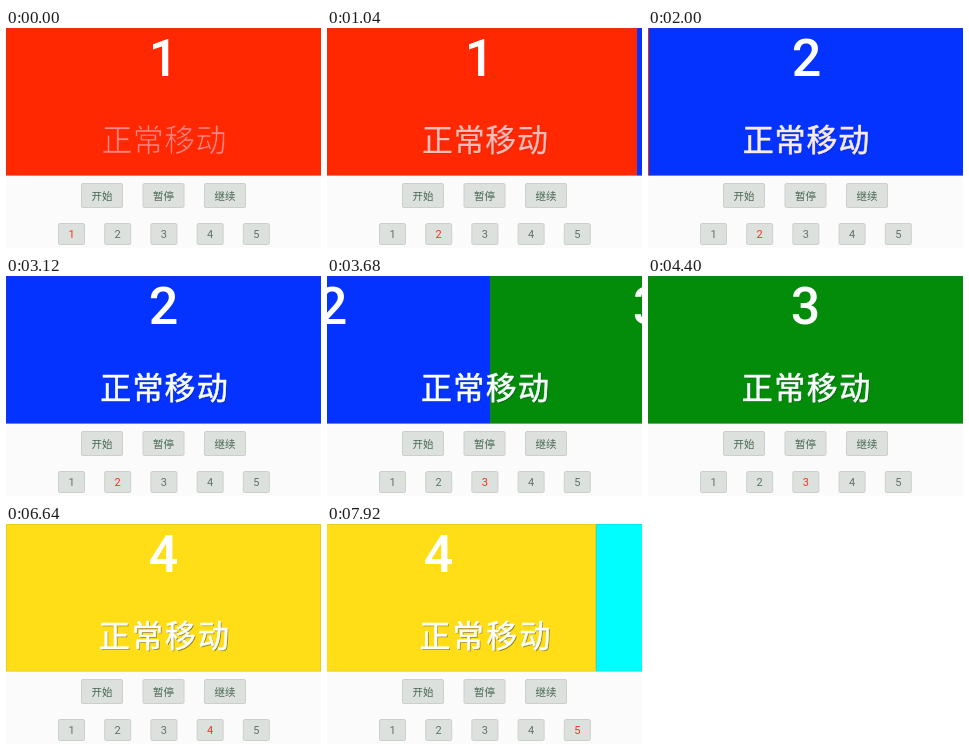
These frames come from a looping animation (315x220 px, 8000 ms). An HTML page:

```html
<!DOCTYPE html>
<html lang="zh">
<head>
<meta charset="utf-8">
<title>Slider</title>
<style>
html, body { margin: 0; width: 100%; height: 100%; overflow: hidden; background: #fbfbfb; }
svg { display: block; width: 100vw; height: 100vh; }
text { text-anchor: middle; }
.digit { font: 500 52px Roboto, Arial, sans-serif; fill: #fff; }
.caption { font: 400 31px "Noto Sans CJK SC", "Noto Sans CJK", sans-serif; }
.label { font: 400 10.5px "Noto Sans CJK SC", "Noto Sans CJK", sans-serif; fill: #456653; }
.num { font: 400 11px Roboto, Arial, sans-serif; fill: #5d7565; }
.num.on { fill: #ff2d20; }
.button { fill: #dde1dd; stroke: #cbd0cb; }
</style>
</head>
<body>
<svg id="stage" viewBox="0 0 315 220">
  <rect width="315" height="220" fill="#fbfbfb"/>
  <g id="slides"></g>
  <text id="shadow" class="caption" y="123.8" fill="#000">正常移动</text>
  <text id="caption" class="caption" y="122.8">正常移动</text>
  <g id="buttons"></g>
</svg>
<script>
const LOOP = 8000, WIDTH = 315, HEIGHT = 147.6, MOVE = 1080;
const starts = [950, 3154, 5406, 7652];
const colors = ['#ff2800', '#0432ff', '#028c0a', '#ffdd17', '#00fdff'];
const byId = id => document.getElementById(id);
const clamp = v => Math.min(1, Math.max(0, v));
const swing = v => 0.5 - Math.cos(Math.PI * clamp(v)) / 2;

function add(parent, tag, attrs, content = '') {
  const el = document.createElementNS('http://www.w3.org/2000/svg', tag);
  for (const key in attrs) el.setAttribute(key, attrs[key]);
  el.textContent = content;
  return parent.appendChild(el);
}

function addButton(x, y, width, height, type, content, baseline) {
  add(byId('buttons'), 'rect', { x: x + 0.5, y: y + 0.5, width: width - 1, height: height - 1, rx: 1.5, class: 'button' });
  return add(byId('buttons'), 'text', { x: x + width / 2, y: baseline, class: type }, content);
}

colors.forEach((fill, i) => {
  const x = i * WIDTH;
  add(byId('slides'), 'rect', { x, y: 0, width: WIDTH, height: HEIGHT, fill });
  add(byId('slides'), 'rect', { x: x + 0.5, y: 0.5, width: WIDTH - 1, height: HEIGHT - 1, fill: 'none', stroke: '#556', 'stroke-opacity': 0.12 });
  add(byId('slides'), 'text', { x: x + 157.5, y: 48, class: 'digit' }, i + 1);
});

['开始', '暂停', '继续'].forEach((name, i) => addButton(75 + i * 61.5, 155, 42, 25, 'label', name, 171.5));
const nums = colors.map((_, i) => addButton(52 + i * 46.2, 195, 27, 22, 'num', i + 1, 209.5));

// Each glyph is centred on its own x, so the tracking can widen smoothly.
function spread(el, gap, shift) {
  el.setAttribute('x', [-1.5, -0.5, 0.5, 1.5].map(k => 158 + shift + k * gap).join(' '));
}

function draw(t) {
  const offset = WIDTH * starts.reduce((sum, s) => sum + swing((t - s) / MOVE), 0);
  byId('slides').setAttribute('transform', `translate(${-Math.round(offset)} 0)`);

  const active = starts.filter(s => t >= s).length;
  nums.forEach((el, i) => el.classList.toggle('on', i === active));

  const gap = 31.4 + 2 * t / LOOP;
  const caption = byId('caption');
  spread(caption, gap, 0);
  spread(byId('shadow'), gap, 1);

  // The glyphs start thin and pink, then fill out to bold white.
  const tint = Math.round(135 + 120 * clamp(t / 2400));
  const fill = `rgb(250 ${tint} ${tint})`;
  const weight = -0.7 + 1.3 * clamp(t / 1500);
  caption.setAttribute('fill', fill);
  caption.setAttribute('stroke', weight < 0 ? colors[0] : fill);
  caption.setAttribute('stroke-width', Math.abs(weight));
  byId('shadow').setAttribute('opacity', 0.4 * clamp(t / 6000));
}

function tick() {
  draw(performance.now() % LOOP);
  requestAnimationFrame(tick);
}
tick();
</script>
</body>
</html>
```
